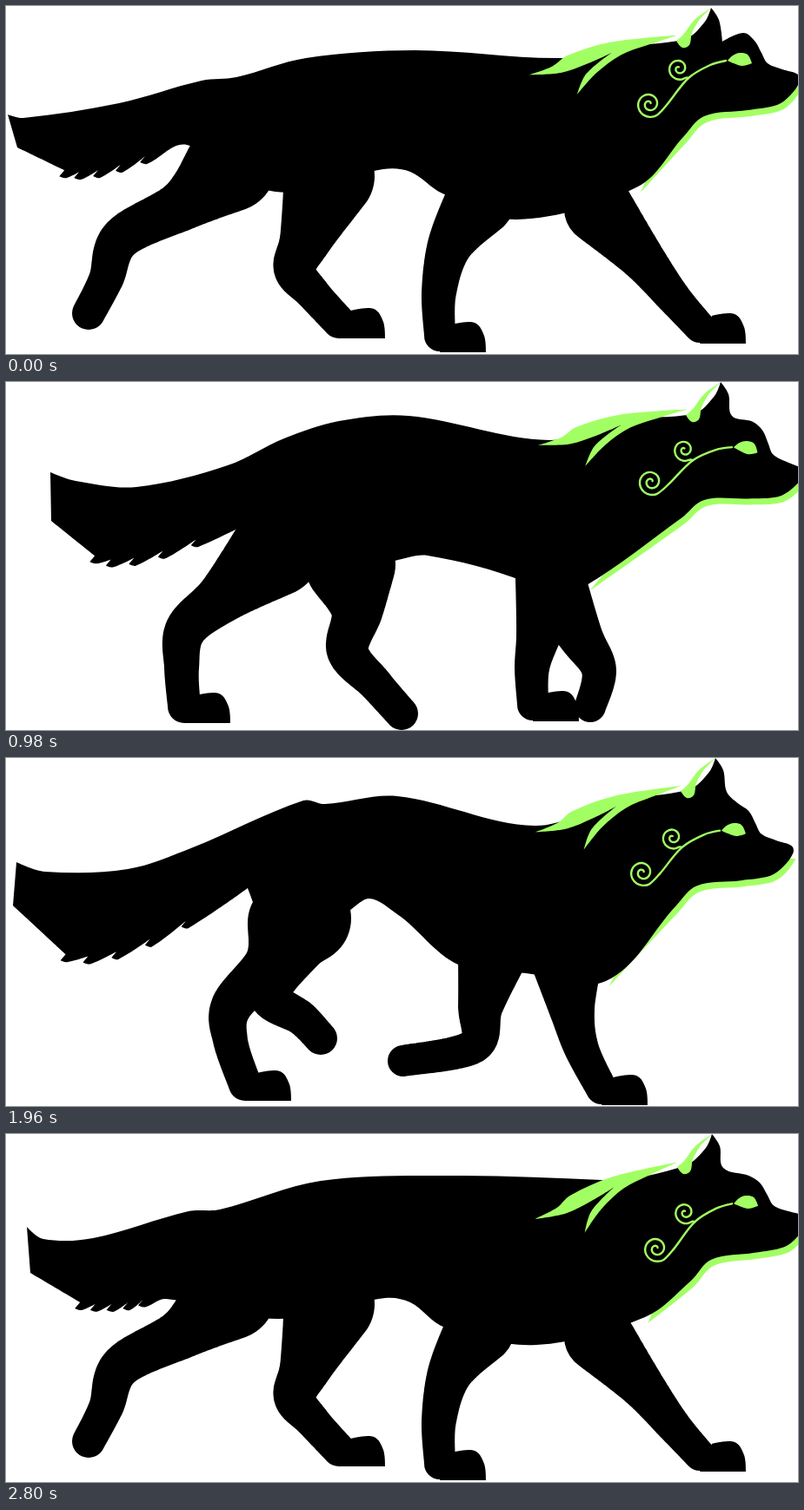
Animation, 911 px wide and 401 px high, one loop 2940 ms. Source, as an HTML page with a canvas:

```html
<!DOCTYPE html>
<html lang="en">
<head>
<meta charset="utf-8">
<title>Walking wolf</title>
<style>
html, body { margin: 0; width: 100%; height: 100%; overflow: hidden; background: #fff; }
canvas { display: block; }
</style>
</head>
<body>
<canvas id="stage" width="911" height="401"></canvas>
<script>
const ctx = document.getElementById('stage').getContext('2d');
const GREEN = '#a2ff63', BLACK = '#000', STEP = 140, STEPS = 21;

const points = s => s.split(' ').map(p => p.split(',').map(Number));
const pose = parts => Object.fromEntries(
  Object.entries(parts).map(([name, s]) => [name, points(s)]));

// Shapes shared by all poses, each relative to its own anchor.
const face = points('3,-31 16,-22 24,-8 31,4 48,11 66,17');
const jaw = points('68,25 57,41 42,52 8,58 -42,65 -66,89');
const eyelid = points('-15,1 -9,-5 -1,-8 8,-6 13,4 2,7 -8,4 -15,1');
const ear = points('3,-6 26,-26 33,-42 42,-28 46,-3');
const earGlow = points('33,-42 14,-28 1,-11 -7,-4 0,4 8,1 11,-13 20,-29');
const mane = points('-174,44 -148,33 -132,20 -83,2 -6,-10 -40,3 -70,16 -97,38 -118,64 -109,40 -81,14 -108,28 -138,40 -174,44');
const paw = points('0,19 53,19 51,0 40,-15 14,-13');

const HIND = [52, 30, 24, 20, 19], FRONT = [40, 26, 20, 18];

// Each foot is on the ground for `hold` steps from `down`.
const legs = {
  hind1: { radii: HIND, down: 20, hold: 11 },
  hind2: { radii: HIND, down: 10, hold: 10 },
  front1: { radii: FRONT, down: 20, hold: 14 },
  front2: { radii: FRONT, down: 10, hold: 14 }
};

// head: eye, spiral, ear base, mane tip. under: middle, low end and left of the tail.
const stretch = pose({
  head: '845,62 740,113 778,44 603,79',
  back: '2,125 20,129 130,112 225,86 265,82 345,60 470,51 640,60',
  belly: '727,208 588,246 502,216 465,191 434,188 310,214 208,160',
  under: '120,194 63,196 13,163',
  hind1: '372,196 345,268 332,303 352,330 383,364',
  hind2: '258,185 205,228 133,267 115,315 95,354',
  front1: '682,234 731,290 767,335 798,370',
  front2: '545,225 511,275 498,330 499,380'
});

const lift = pose({
  head: '839,67 736,119 780,32 607,82',
  back: '28,84 60,103 130,112 230,83 327,48 370,33 440,30 607,65',
  belly: '730,213 595,262 515,232 455,190 416,183 317,250 274,135',
  under: '168,199 100,198 38,135',
  hind1: '337,190 308,235 261,282 267,330 280,371',
  hind2: '345,185 335,222 300,268 330,300 350,329',
  front1: '660,235 663,290 672,335 690,380',
  front2: '556,225 541,290 540,338 462,356'
});

const pass = pose({
  head: '852,76 742,115 789,42 610,73',
  back: '51,104 80,114 150,121 255,96 320,65 383,45 463,39 625,67',
  belly: '668,234 620,250 594,229 485,200 447,206 346,226 286,159',
  under: '165,207 98,206 52,160',
  hind1: '310,195 250,247 207,285 202,330 205,374',
  hind2: '396,210 404,262 393,310 425,348 455,382',
  front1: '626,226 613,290 605,330 606,372',
  front2: '626,226 660,292 682,332 672,374'
});

const push = pose({
  head: '834,80 729,129 777,40 607,92',
  back: '14,141 50,152 130,149 200,124 330,69 380,49 435,44 630,69',
  belly: '712,225 605,249 525,206 470,182 432,184 313,222 247,184',
  under: '136,242 62,230 16,180',
  hind1: '280,200 245,228 198,240 213,290 217,335',
  hind2: '372,205 338,262 327,295 340,335 360,371',
  front1: '556,220 519,276 478,325 478,374',
  front2: '672,232 694,298 720,345 744,378'
});

const lift2 = pose({
  head: '838,83 732,132 783,42 606,86',
  back: '12,120 45,131 140,128 215,103 342,49 367,53 450,44 608,78',
  belly: '690,257 598,248 520,238 450,180 411,164 320,262 278,150',
  under: '148,224 62,232 8,170',
  hind1: '345,185 335,220 303,272 340,300 362,323',
  hind2: '330,190 305,235 260,285 258,325 275,376',
  front1: '560,225 546,285 538,332 457,349',
  front2: '645,235 651,290 662,335 685,381'
});

const pass2 = pose({
  head: '852,89 742,127 790,48 612,89',
  back: '22,103 60,114 150,109 250,93 325,66 370,49 463,39 600,67',
  belly: '672,237 614,262 560,239 480,226 449,210 344,209 248,160',
  under: '146,209 72,208 32,152',
  hind1: '397,200 393,258 394,298 432,338 468,371',
  hind2: '295,185 240,245 200,295 195,340 203,378',
  front1: '632,226 668,292 715,335 726,371',
  front2: '600,235 589,295 597,340 607,382'
});

const stretch2 = {
  ...stretch,
  ...pose({
    head: '852,79 748,132 779,42 608,98',
    back: '24,107 43,121 100,120 210,89 246,87 362,54 520,48 685,53',
    belly: '735,211 610,243 505,223 465,194 436,189 313,213 184,190',
    under: '132,203 80,201 28,160'
  })
};

function mix(a, b, k) {
  const out = {};
  for (const name in a) {
    out[name] = a[name].map(([x, y], i) => {
      const [u, v] = b[name][i];
      return [x + (u - x) * k, y + (v - y) * k];
    });
  }
  return out;
}

const swapLegs = (body, from) => ({
  ...body, hind1: from.hind2, hind2: from.hind1, front1: from.front2, front2: from.front1
});

const keys = [
  [0, stretch],
  [2, swapLegs(mix(stretch, lift, 0.5), push)],
  [4, lift],
  [7, pass],
  [10, swapLegs(stretch2, stretch2)],
  [12, push],
  [14, lift2],
  [17, pass2],
  [20, stretch2],
  [STEPS, stretch]
];

function poseAt(step) {
  const i = keys.findIndex(([at]) => at > step);
  const [from, a] = keys[i - 1], [to, b] = keys[i];
  return mix(a, b, (step - from) / (to - from));
}

const place = (pts, [ox, oy], angle = 0) => {
  const c = Math.cos(angle), s = Math.sin(angle);
  return pts.map(([x, y]) => [ox + x * c - y * s, oy + x * s + y * c]);
};

// Turn that carries the resting direction (rx, ry) onto the line from a to b.
const turnOf = ([ax, ay], [bx, by], [rx, ry]) => {
  const d = Math.atan2(by - ay, bx - ax) - Math.atan2(ry, rx);
  return Math.atan2(Math.sin(d), Math.cos(d));
};

// Smooth curve through the points; sharp turns stay corners.
function curve(pts) {
  const tangent = pts.map(([x, y], i) => {
    if (!i || i === pts.length - 1) return [0, 0];
    const [ax, ay] = pts[i - 1], [bx, by] = pts[i + 1];
    const ux = x - ax, uy = y - ay, vx = bx - x, vy = by - y;
    const bend = (ux * vx + uy * vy) / (Math.hypot(ux, uy) * Math.hypot(vx, vy) || 1);
    if (bend < 0.3) return [0, 0];
    const len = Math.hypot(bx - ax, by - ay) || 1;
    return [(bx - ax) / len, (by - ay) / len];
  });
  ctx.beginPath();
  ctx.moveTo(...pts[0]);
  for (let i = 1; i < pts.length; i++) {
    const [x, y] = pts[i - 1], [u, v] = pts[i];
    const d = Math.hypot(u - x, v - y) / 3;
    const [sx, sy] = tangent[i - 1], [ex, ey] = tangent[i];
    ctx.bezierCurveTo(x + sx * d, y + sy * d, u - ex * d, v - ey * d, u, v);
  }
}

function shape(pts, color, inner) {
  curve(pts);
  if (inner) ctx.lineTo(...inner);
  ctx.closePath();
  ctx.fillStyle = color;
  ctx.fill();
}

// Catmull-Rom value between b and c.
const blend = (a, b, c, d, t) => b + t / 2 * (c - a
  + t * (2 * a - 5 * b + 4 * c - d + t * (3 * (b - c) + d - a)));

// A limb is a disc swept along its joints while the radius changes.
function limb(joints, radii) {
  const nodes = joints.map(([x, y], i) => [x, y, radii[i]]);
  const at = i => nodes[Math.max(0, Math.min(nodes.length - 1, i))];
  ctx.fillStyle = BLACK;
  ctx.beginPath();
  for (let i = 0; i < nodes.length - 1; i++) {
    for (let t = 0; t <= 1; t += 1 / 32) {
      const [x, y, r] = [0, 1, 2].map(n =>
        blend(at(i - 1)[n], at(i)[n], at(i + 1)[n], at(i + 2)[n], t));
      ctx.moveTo(x + r, y);
      ctx.arc(x, y, r, 0, 7);
    }
  }
  ctx.fill();
}

// Tail underside from the root to the low end, with hanging tufts.
function tufts([rx, ry], [mx, my], [lx, ly]) {
  const out = [];
  const quad = (a, m, b, t) => a * (1 - t) * (1 - 2 * t) + 4 * m * t * (1 - t) + b * t * (2 * t - 1);
  for (const t of [0.25, 0.42, 0.6, 0.78, 0.95]) {
    const x = quad(rx, mx, lx, t), y = quad(ry, my, ly, t);
    out.push([x + 2, y + 1], [x - 6, y - 1], [x, y - 8]);
  }
  return out;
}

function spiral([cx, cy], radius, angle, turns) {
  return Array.from({ length: 22 }, (_, i) => {
    const k = i / 21, r = radius * (1 - 0.88 * k), a = angle + k * turns * 2 * Math.PI;
    return [cx + r * Math.cos(a), cy + r * Math.sin(a)];
  });
}

const vine = [...points('-17,1 -35,6 -60,21 -85,52'), ...spiral([-105, 51], 15.5, 1, 1.75)];
const sprig = [[-60, 21], ...spiral([-71, 10], 13.5, 0.9, 1.6)];

function draw(p, step) {
  const [eye, curl, earBase, maneTip] = p.head;
  const tilt = turnOf(eye, curl, [-105, 51]);
  const hair = place(mane, earBase, turnOf(earBase, maneTip, mane[0]));
  const [chest, ...belly] = p.belly;
  const [mid, low, left] = p.under;
  const throat = [...place(jaw, eye, tilt), chest];
  const nape = [hair[3][0], hair[3][1] + 6];

  ctx.fillStyle = '#fff';
  ctx.fillRect(0, 0, 911, 401);
  shape(place(throat, [3, 7]), GREEN, [eye[0] - 60, eye[1] + 20]);

  for (const name in legs) {
    const { radii, down, hold } = legs[name], joints = p[name];
    limb(joints, radii);
    if ((step - down + STEPS) % STEPS < hold) {
      shape(place(paw, joints[joints.length - 1]), BLACK);
    }
  }

  shape([
    ...p.back, nape, ...place(ear, earBase), ...place(face, eye, tilt), ...throat,
    ...belly, ...tufts(belly[belly.length - 1], mid, low), left
  ], BLACK);
  shape(hair, GREEN);
  shape(place(earGlow, earBase), GREEN);

  shape(place(eyelid, eye, tilt), GREEN);
  ctx.strokeStyle = GREEN;
  ctx.lineWidth = 2.4;
  ctx.lineCap = 'round';
  for (const line of [vine, sprig]) {
    curve(place(line, eye, tilt));
    ctx.stroke();
  }
}

const start = performance.now();
function frame() {
  const t = Math.max(0, performance.now() - start);
  const step = Math.floor(t / STEP) % STEPS;
  draw(poseAt(step), step);
  requestAnimationFrame(frame);
}
frame();
</script>
</body>
</html>
```
